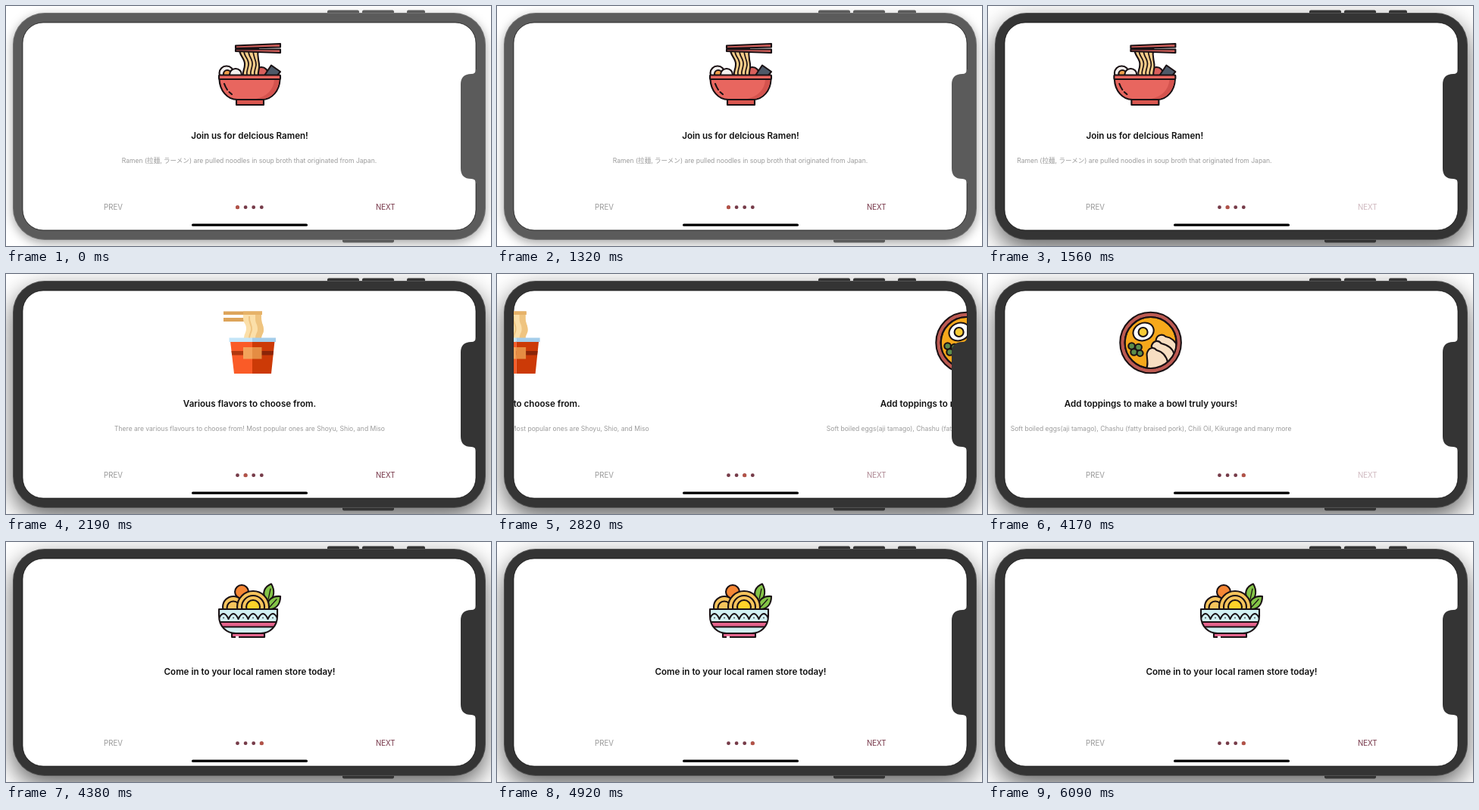
Recreate the animation shown at these times as an HTML page. Size 640 by 318 pixels, loop 6.12 s.

```html
<!DOCTYPE html>
<html lang="ja">
<head>
<meta charset="utf-8">
<title>Ramen onboarding</title>
<style>
  html, body { margin: 0; width: 100%; height: 100%; overflow: hidden; background: #fff; }
  .stage { position: relative; width: 640px; height: 318px; overflow: hidden; }
  .stage, .body, .pages, .next, .current { animation: 6120ms step-end infinite; }
  .stage { animation-name: focus; }
  .body {
    position: absolute; left: 9px; top: 9px; width: 624px; height: 301px;
    border-radius: 42px; background: currentColor; animation-name: shadow;
  }
  svg { position: absolute; left: 0; top: 0; }
  text { font-family: Inter, "Noto Sans CJK JP", "Noto Sans CJK", sans-serif; text-anchor: middle; }
  .title { font-size: 11.6px; font-weight: 600; fill: #111; }
  .note { font-size: 8.55px; fill: #9b9b9b; }
  .btn { font-size: 9.7px; }
  .ink { stroke: #1a1114; stroke-width: 2.1; stroke-linejoin: round; stroke-linecap: round; }
  .line { fill: none; }
  .pages { animation-name: slide; }
  .next { animation-name: press; }
  .current { animation-name: step; }

  @keyframes focus {
    0% { color: #5b5b5b; }
    22.55%, 100% { color: #343434; }
  }
  @keyframes shadow {
    0% { box-shadow: 0 4px 14px rgba(0, 0, 0, .36); }
    22.55%, 100% { box-shadow: 0 12px 32px rgba(0, 0, 0, .62); }
  }
  @keyframes slide {
    0% { transform: translateX(0); }
    24.02% { transform: translateX(0); animation-timing-function: ease-in-out; }
    28.92% { transform: translateX(-598px); }
    43.642% { transform: translateX(-598px); animation-timing-function: ease-in-out; }
    48.544% { transform: translateX(-1196px); }
    66.72% { transform: translateX(-1196px); animation-timing-function: ease-in-out; }
    71.622%, 100% { transform: translateX(-1794px); }
  }
  @keyframes press {
    0%, 28.92%, 48.544%, 71.622%, 100% { opacity: 1; }
    22.55%, 42.16%, 65.2% { opacity: .2; }
    24.02%, 43.642%, 66.72% { opacity: .2; animation-timing-function: ease-in-out; }
  }
  @keyframes step {
    0% { transform: translateX(0); }
    24.02% { transform: translateX(10.6px); }
    43.642% { transform: translateX(21.2px); }
    66.72%, 100% { transform: translateX(31.8px); }
  }
</style>
</head>
<body>
<div class="stage">
  <div class="body"></div>
  <svg width="640" height="318" viewBox="0 0 640 318">
    <defs>
      <clipPath id="screen"><rect x="22" y="22" width="598" height="275" rx="27"/></clipPath>
      <clipPath id="soup"><circle cx="321" cy="91" r="33.5"/></clipPath>
      <clipPath id="bowl"><path d="M281 89H358V98C358 112 348 121 336 121H303C291 121 281 112 281 98Z"/></clipPath>
    </defs>

    <!-- side buttons -->
    <g fill="currentColor">
      <rect x="424" y="5.5" width="42" height="8" rx="2"/>
      <rect x="470" y="5.5" width="42" height="8" rx="2"/>
      <rect x="529" y="5.5" width="24" height="8" rx="2"/>
      <rect x="444" y="306" width="68" height="7.5" rx="2"/>
    </g>
    <rect x="9.5" y="9.5" width="623" height="300" rx="41.5" fill="none" stroke="#fff" stroke-opacity=".14"/>
    <rect x="22" y="22" width="598" height="275" rx="27" fill="#fff" stroke="#000" stroke-opacity=".65"/>

    <g clip-path="url(#screen)">
      <g class="pages">
        <!-- ramen bowl -->
        <g>
          <g class="ink">
            <circle cx="291" cy="89" r="9.5" fill="#f4f1ee"/>
            <circle cx="292" cy="90" r="5" fill="#f0a04b"/>
            <circle cx="303" cy="91" r="8" fill="#f4f1ee"/>
            <circle cx="337" cy="90" r="9" fill="#d9605c"/>
            <path d="M341 92L350 78.500L362 87L358 92Z" fill="#4e5a69"/>
            <path d="M308 56C307 66 316 69 315 78C315 84 312 86 313 92H333C332 86 335 84 334 77C333 69 331 66 333 56Z" fill="#f8cd8a"/>
            <path class="line" d="M314 58C313 67 321 69 320 78C319 85 317 86 318 91M320 58C319 67 326 69 325 78C324 85 322 86 323 91M326.500 58C325 67 330 69 330 78C329 85 327 86 328 91" stroke-width="1.700"/>
            <path d="M303 52.500L362 50V54.500L303 56Z" fill="#da625d"/>
            <path d="M303 57.500H362V62L303 60Z" fill="#da625d"/>
            <path d="M304 122H340V131H304Z" fill="#d9564f"/>
            <path d="M281.500 97C282 112 292 124 305 124H338C351 124 361 112 361.500 97Z" fill="#e8665f"/>
            <rect x="281" y="91.500" width="81" height="5.500" rx="1" fill="#e8665f"/>
          </g>
          <path d="M354 98H360.500C360 111 350 123 338 123H330C344 120 353 111 354 98Z" fill="#d4534e"/>
          <path class="ink line" d="M288 103C289 106 290 108 292 111M294.500 114L298 117"/>
          <text class="title" x="321.5" y="176.300">Join us for delcious Ramen!</text>
          <text class="note" x="321" y="208.300">Ramen (拉麺, ラーメン) are pulled noodles in soup broth that originated from Japan.</text>
        </g>

        <!-- noodle cup -->
        <g transform="translate(598)">
          <path d="M287 49.500H338V54H287ZM287 58H318V63H287Z" fill="#dda45a"/>
          <path d="M313 50H337V58C337 66 340 67 340 74C340 79 337 80 337 86H314C314 79 317 78 317 72C317 66 313 65 313 59Z" fill="#fbdfa9"/>
          <path d="M329 54H337V58C337 66 340 67 340 74C340 79 337 80 337 86H329C329 79 332 78 332 73C332 66 329 66 329 59Z" fill="#efc480"/>
          <path d="M321 56C320 65 325 67 324 74C323 79 321 80 321 86" fill="none" stroke="#efc480" stroke-width="2"/>
          <path d="M313 49.500H338V54H313Z" fill="#e6b268"/>
          <path d="M296 89H325V132H301Z" fill="#fa5b27"/>
          <path d="M325 89H354.500L350 132H325Z" fill="#cc3a07"/>
          <path d="M297.500 102H325V107.500H298.200Z" fill="#b0380f"/>
          <path d="M325 102H353L352.300 107.500H325Z" fill="#8a2508"/>
          <path d="M313 97H325V112.500H313Z" fill="#f3a35a"/>
          <path d="M325 97H337.500V112.500H325Z" fill="#e58d43"/>
          <path d="M294.500 84.500H325V90H294.500Z" fill="#c3e5f8"/>
          <path d="M325 84.500H356V90H325Z" fill="#a4cdea"/>
          <text class="title" x="321.5" y="176.300">Various flavors to choose from.</text>
          <text class="note" x="321.5" y="208.300">There are various flavours to choose from! Most popular ones are Shoyu, Shio, and Miso</text>
        </g>

        <!-- toppings -->
        <g transform="translate(1196)">
          <g class="ink">
            <circle cx="321" cy="91" r="40.300" fill="#bd5a52"/>
            <circle cx="321" cy="91" r="34" fill="#f6a81b"/>
            <ellipse cx="311.500" cy="76.500" rx="14" ry="11.500" transform="rotate(-25 311.500 76.500)" fill="#fff"/>
            <circle cx="311" cy="77" r="6" fill="#f8cb35"/>
            <g fill="#5c8d4b">
              <circle cx="296" cy="95.500" r="4.300"/><circle cx="305" cy="97" r="4.300"/>
              <circle cx="299" cy="103.500" r="4.300"/><circle cx="307" cy="105" r="4"/>
            </g>
            <g clip-path="url(#soup)" fill="#f7dec2">
              <path d="M328 88C329 80 337 79 341 83C348 84 354 89 356 96L354 108L343 99C338 96 332 95 328 88Z"/>
              <path d="M322 96C324 88 331 87 335 92C343 94 350 98 352 106L346 119L337 108C333 103 326 103 322 96Z"/>
              <path d="M316 106C318 97 325 96 329 101C337 103 342 109 344 118L334 128H314C319 121 316 113 316 106Z"/>
            </g>
            <circle class="line" cx="321" cy="91" r="34"/>
          </g>
          <text class="title" x="321.5" y="176.300">Add toppings to make a bowl truly yours!</text>
          <text class="note" x="321.5" y="208.300">Soft boiled eggs(aji tamago), Chashu (fatty braised pork), Chili Oil, Kikurage and many more</text>
        </g>

        <!-- store bowl -->
        <g transform="translate(1794)">
          <g class="ink">
            <circle cx="311" cy="66" r="9" fill="#f58634"/>
            <path d="M343 76C337 68 341 59 350 55.500C355 64 354 73 347 80Z" fill="#83c447"/>
            <path d="M344 88C344 77 351 71 362 72C362 82 357 88 349 89Z" fill="#83c447"/>
            <path class="line" d="M349 62L346 76M357 76L348 86" stroke-width="1.200"/>
            <g fill="#f6c45c">
              <circle cx="300" cy="86" r="14"/><circle cx="300" cy="87" r="8.500"/>
              <circle cx="326" cy="86" r="21"/><circle cx="326" cy="86" r="15"/>
              <circle cx="326" cy="86" r="9" fill="#ffd329"/>
            </g>
          </g>
          <g clip-path="url(#bowl)">
            <path d="M278 88H360V122H278Z" fill="#d2f1f3"/>
            <path d="M278 106H360V112H278Z" fill="#e4638c"/>
            <path class="ink line" d="M280.500 102q6.500 -14 13 0q6.500 -14 13 0q6.500 -14 13 0q6.500 -14 13 0q6.500 -14 13 0q6.500 -14 13 0" stroke-width="1.600"/>
            <path class="ink" d="M280 106H360M280 112.500H360" stroke-width="1.500"/>
            <path d="M286.300 100.500H356" stroke="#1a1114" stroke-width="1.400" stroke-dasharray="1.400 11.600"/>
          </g>
          <g class="ink">
            <path class="line" d="M281 89H358V98C358 112 348 121 336 121H303C291 121 281 112 281 98Z"/>
            <path d="M298 121H341V126H298Z" fill="#e4638c"/>
          </g>
          <path d="M303 126H307" stroke="#fff" stroke-width="2.500"/>
          <text class="title" x="321.5" y="176.300">Come in to your local ramen store today!</text>
        </g>
      </g>

      <!-- controls -->
      <text class="btn" x="141.500" y="270" fill="#999">PREV</text>
      <text class="btn next" x="500.800" y="270" fill="#763648">NEXT</text>
      <g fill="#753a48">
        <circle cx="305.500" cy="266.700" r="2.400"/>
        <circle cx="316.100" cy="266.700" r="2.400"/>
        <circle cx="326.700" cy="266.700" r="2.400"/>
        <circle cx="337.300" cy="266.700" r="2.400"/>
      </g>
      <circle class="current" cx="305.500" cy="266.700" r="2.500" fill="#b45246"/>
      <rect x="245" y="288.600" width="153" height="3.200" rx="1.600"/>
    </g>

    <path fill="currentColor" d="M621 84H620Q620 90 614 90Q600 90 600 104V215Q600 229 614 229Q620 229 620 235H621Z"/>
  </svg>
</div>
</body>
</html>
```
